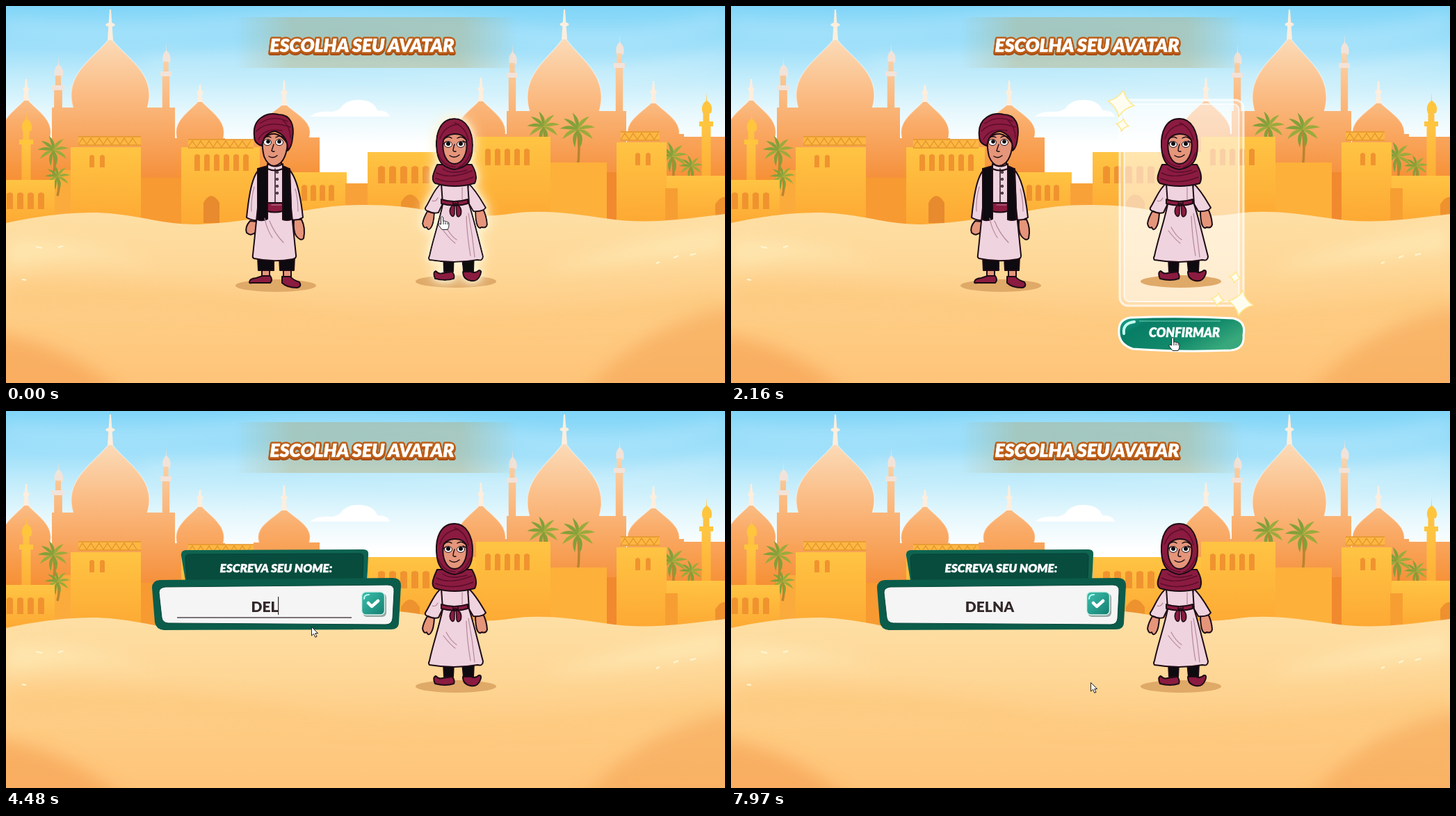
An HTML page for the animation above (8000 ms loop, 1034 px wide and 542 px high).

```html
<!DOCTYPE html>
<html lang="pt">
<head>
<meta charset="utf-8">
<title>Escolha seu avatar</title>
<style>
html, body { margin: 0; width: 100%; height: 100%; overflow: hidden; background: #fed795; }
svg { display: block; width: 100%; height: 100%; }
text { font-family: Lato, "Open Sans", sans-serif; font-weight: 900; text-anchor: middle; }
.label { font-style: italic; fill: #fff; stroke: #fff; stroke-width: .5; }
.ink { stroke: #1d0b14; stroke-width: 2; stroke-linejoin: round; stroke-linecap: round; }
.thin { fill: none; stroke: #1d0b14; stroke-width: 1.4; stroke-linecap: round; }
.fold { fill: none; stroke: #b58799; stroke-width: 1.2; stroke-linecap: round; }
.wine { fill: #8b1b40; }
.shade { fill: none; stroke: #5c0d2b; stroke-width: 1.4; stroke-linecap: round; }
.cloth { fill: #efd3df; }
.skin { fill: #e5957a; }
.black { fill: #0d0a10; }
</style>
</head>
<body>
<svg viewBox="0 0 1034 542" preserveAspectRatio="none">
  <defs>
    <linearGradient id="sky" x2="0" y2="1">
      <stop stop-color="#80d5f8"/><stop offset=".2" stop-color="#a0e0fa"/>
      <stop offset=".33" stop-color="#c2ecfb"/><stop offset=".48" stop-color="#e4f7fd"/>
      <stop offset=".64" stop-color="#fff"/>
    </linearGradient>
    <linearGradient id="far" gradientUnits="userSpaceOnUse" x1="0" x2="0" y1="45" y2="250">
      <stop stop-color="#fbdcba"/><stop offset=".4" stop-color="#fbbc84"/><stop offset="1" stop-color="#f58f3a"/>
    </linearGradient>
    <linearGradient id="near" gradientUnits="userSpaceOnUse" x1="0" x2="0" y1="105" y2="250">
      <stop stop-color="#f9cda0"/><stop offset=".45" stop-color="#faab68"/><stop offset="1" stop-color="#f69035"/>
    </linearGradient>
    <linearGradient id="wall" x2="0" y2="1">
      <stop stop-color="#ffc443"/><stop offset="1" stop-color="#fda934"/>
    </linearGradient>
    <linearGradient id="sand" x2="0" y2="1">
      <stop stop-color="#fee0a6"/><stop offset=".35" stop-color="#fed797"/>
      <stop offset=".7" stop-color="#fecb82"/><stop offset="1" stop-color="#fec479"/>
    </linearGradient>
    <linearGradient id="band">
      <stop stop-color="#b9a35c" stop-opacity="0"/><stop offset=".2" stop-color="#b9a35c" stop-opacity=".36"/>
      <stop offset=".8" stop-color="#b9a35c" stop-opacity=".36"/><stop offset="1" stop-color="#b9a35c" stop-opacity="0"/>
    </linearGradient>
    <linearGradient id="green" x2="1" y2=".5">
      <stop stop-color="#23a78f"/><stop offset=".25" stop-color="#087d66"/>
      <stop offset=".7" stop-color="#128a6a"/><stop offset="1" stop-color="#38a87c"/>
    </linearGradient>
    <linearGradient id="teal" x2="1" y2="1">
      <stop stop-color="#3cc0ae"/><stop offset="1" stop-color="#137e70"/>
    </linearGradient>
    <filter id="soft" x="-50%" y="-100%" width="200%" height="300%"><feGaussianBlur stdDeviation="12"/></filter>
    <filter id="glow" x="-60%" y="-20%" width="220%" height="140%">
      <feDropShadow dx="0" dy="0" stdDeviation="4" flood-color="#fff8e0"/>
      <feDropShadow dx="0" dy="0" stdDeviation="9" flood-color="#fff4cf"/>
    </filter>
  </defs>

  <rect width="1034" height="310" fill="url(#sky)"/>
  <path d="M0 28Q180 42 340 24T700 34T1034 18M200 84Q430 66 620 92T1034 72" fill="none" stroke="#fff" stroke-opacity=".3" stroke-width="12" filter="url(#soft)"/>
  <path d="M437 159q10-9 32-7q7-1 12-5q8-13 28-12q20 1 25 15q15 0 18 9z" fill="#fff"/>
  <g id="city"></g>

  <path d="M0 312C50 301 90 297 130 297C190 299 220 314 275 314C350 311 420 294 470 288C520 284 570 286 610 295C650 303 690 304 730 298C770 292 820 299 860 305C920 315 980 306 1034 299V542H0z" fill="url(#sand)"/>
  <g filter="url(#soft)">
    <path d="M0 335Q110 332 220 375Q120 350 0 378z" fill="#fff0bd" opacity=".55"/>
    <path d="M1034 318Q880 340 770 380Q900 368 1034 352z" fill="#fff0bd" opacity=".55"/>
    <path d="M0 395Q220 388 430 432T1034 405V440Q650 470 430 450T0 440z" fill="#fcbb66" opacity=".25"/>
    <path d="M-20 470Q90 485 170 560H-20z" fill="#f28f3f" opacity=".42"/>
    <path d="M1054 430Q910 455 830 560H1054z" fill="#f39645" opacity=".4"/>
  </g>
  <path d="M43 346l9 2M75 347l7-2M23 393l6 1M960 362l7-3M984 358l8-2M935 370l5-2" stroke="#fff6d2" stroke-width="2"/>

  <rect x="330" y="16" width="405" height="73" fill="url(#band)"/>
  <g class="label" font-size="26.5" paint-order="stroke" stroke-linejoin="round">
    <text x="512" y="67.5" fill="#a94c12" stroke="#a94c12" stroke-width="6">ESCOLHA SEU AVATAR</text>
    <text x="512" y="66" stroke="#bd5f18" stroke-width="5.5">ESCOLHA SEU AVATAR</text>
    <text x="512" y="66">ESCOLHA SEU AVATAR</text>
  </g>

  <g id="card">
    <rect x="559" y="135" width="178" height="296" rx="12" fill="#fff" fill-opacity=".3" stroke="#fff" stroke-opacity=".7" stroke-width="3"/>
    <rect x="565.5" y="141" width="165" height="284" rx="8" fill="#fff" fill-opacity=".38" stroke="#fff" stroke-opacity=".7" stroke-width="2"/>
    <g id="stars" fill="#fffdf0" stroke="#ffe88c" stroke-width="1.5"></g>
    <path id="buttonShadow" d="M576 449Q650 444 725 450Q744 454 740 474Q742 496 722 497Q645 502 578 496Q556 489 558 466Q558 452 576 449z" fill="#8e5b30" opacity=".75"/>
    <path d="M574 448Q650 445 722 449Q741 453 737 473Q739 493 719 495Q645 498 578 493Q556 486 558 465Q558 451 574 448z" fill="url(#green)" stroke="#fff" stroke-width="3"/>
    <path d="M565 471Q563 456 580 454" fill="none" stroke="#c4fff2" stroke-width="4" stroke-linecap="round"/>
    <path d="M587 453H704" stroke="#6fd1b3" stroke-width="2" opacity=".5"/>
    <text class="label" x="652" y="476" font-size="17.9">CONFIRMAR</text>
  </g>

  <g id="boy">
    <ellipse cx="388" cy="402" rx="58" ry="9" fill="#dfa968"/>
    <g class="ink">
      <path class="skin" d="M368 378h11v13h-11zM399 378h11v13h-11z"/>
      <path class="black" d="M362 360h23v20h-22zM393 360h22l-1 20h-20z"/>
      <path class="wine" d="M350 397q0-5 10-6l9-3h11q4 6 0 10h-26q-4 1-4-1zM397 389h12q4 5 13 8q4 7-4 8q-14 0-21-7z"/>
      <path class="skin" d="M351 309q-8 9-5 17q5 4 8 2q6-1 6-7q3-6 1-11zM414 307q-1 17 3 23q7 9 11 4q3-15-3-27z"/>
      <path class="cloth" d="M364 235C352 246 348 285 346 304q8 5 17 4L369 270zM407 235C420 248 425 285 427 304q-8 5-17 3L404 270z"/>
      <path class="cloth" d="M362 234h46L410 290L417 358q1 5-5 6q-28 5-55-1q-3-1-2-5L362 290z"/>
      <path class="skin" d="M378 218h18v13q-9 4-18 0z"/>
      <path class="cloth" d="M376 227q12 7 22 0v7q-11 5-22 0z"/>
      <path class="wine" d="M375 283h23v12q-11 3-23 0z"/>
      <path class="black" d="M362 234L376 230V306q-8 4-14 1zM398 230L407 234q3 40 3 73q-6 2-12 0z"/>
      <path class="skin" d="M369 192q-1 12 2 24q5 13 14 14q17-2 20-32q-17-25-36-6z"/>
      <path class="wine" d="M357 187C354 161 376 152 392 156C410 156 415 172 412 190Q411 203 405 208Q406 186 387 180Q371 182 368 201Q357 198 357 187z"/>
    </g>
    <path class="shade" d="M360 180Q375 163 409 174M365 169Q383 156 405 166M363 192Q371 175 397 179M398 164Q409 174 409 190"/>
    <path class="thin" d="M387 234V282M371 190q5-4 10-1M388 189q6-4 11 0M385 199q-2 6-3 9q2 2 4 1M378 216q6 4 12-1"/>
    <path class="fold" d="M379 309q7 18 20 31M372 305q3 16 11 28M357 260q-5 18-4 35M416 263q4 14 4 32M382 286h14"/>
    <g fill="#fff" stroke="#1d0b14"><ellipse cx="376" cy="196" rx="5.5" ry="4.5"/><ellipse cx="393" cy="196" rx="5.5" ry="4.5"/></g>
    <g class="black"><circle cx="377" cy="195" r="2.8"/><circle cx="393" cy="195" r="2.8"/></g>
    <g class="thin"><circle cx="390" cy="239" r="1.4"/><circle cx="390" cy="249" r="1.4"/><circle cx="390" cy="259" r="1.4"/><circle cx="390" cy="269" r="1.4"/></g>
  </g>

  <g id="girl">
    <ellipse cx="647" cy="396" rx="58" ry="9" fill="#dfa968"/>
    <g id="girlBody">
    <g class="ink">
      <path class="black" d="M629 362h15l-1 20h-13zM656 362h17l-1 20h-14z"/>
      <path class="wine" d="M617 392q-4-9 1-11q5 5 10 3l14-2q4 6 2 10q-12 4-27 0zM657 382h12q6 3 11-2q5-1 2 7q-4 10-14 8q-11-2-11-13z"/>
      <path class="skin" d="M606 295q-6 10-7 18q2 8 6 5q2 6 6 1q4-5 5-21zM675 293q0 17 3 23q3 5 6 2q7 2 8-4q-1-13-6-22z"/>
      <path class="cloth" d="M626 255C615 263 610 280 603 290q-1 4 4 5q8 4 15 2L631 278zM665 255C676 265 684 280 690 290q-4 6-18 5L662 278z"/>
      <path class="cloth" d="M626 255H664L666 285C674 310 682 345 686 360q0 7-8 5Q645 371 609 365q-2-2 0-6C614 335 623 310 628 285z"/>
      <path class="wine" d="M626 278q18 6 38 0v6q-18 6-38 0z"/>
      <path class="wine" d="M620 228C612 245 612 251 617 255Q645 263 674 255C679 246 674 235 670 228z"/>
      <path class="wine" d="M645 162C625 162 618 182 619 202C620 222 626 232 645 235C664 232 671 222 671 200C671 182 663 162 645 162z"/>
      <path class="skin" d="M629 193C633 182 656 180 662 193C665 212 656 227 645 227C634 227 626 212 629 193z"/>
    </g>
    <path class="shade" d="M624 191Q630 172 651 170M665 193Q661 174 645 168M622 213Q629 231 646 231M668 211Q661 229 650 232M619 240Q639 250 670 237M618 248Q643 258 672 246M628 234Q640 243 663 236"/>
    <g fill="#8b1b40" stroke="#1d0b14" stroke-width="1.5"><path d="M645 284q-9 6-6 15q4 7 6 0zM647 284q10 6 7 16q-4 6-6 0zM643 281h7v6h-7z"/></g>
    <path class="thin" d="M630 191q6-5 11-1M649 190q6-4 11 1M645 199q-2 6-2 9q2 2 4 1M638 215q7 5 14-1M629 198l4-3M661 196l-4-2"/>
    <path class="fold" d="M656 261v17M665 298Q671 330 674 361M662 302Q663 330 668 359M629 323q10 13 17 18M633 318q7 13 15 18M613 280q5 2 8-4"/>
    <g fill="#fff" stroke="#1d0b14"><ellipse cx="636" cy="199" rx="5.5" ry="4.3"/><ellipse cx="654" cy="199" rx="5.5" ry="4.3"/></g>
    <g class="black"><circle cx="636" cy="198" r="3"/><circle cx="654" cy="198" r="3"/></g>
    </g>
  </g>

  <g id="panel">
    <path d="M258 200L514 199Q522 199 521 207L519 250H259L252 208Q251 201 258 200z" fill="#0d6450"/>
    <path d="M264 206L509 205Q514 205 514 210L513 241Q512 246 506 246H267Q261 246 260 241L258 212Q258 206 264 206z" fill="#084c3e" stroke="#0a3f35"/>
    <text class="label" x="388.5" y="232" font-size="17.2">ESCREVA SEU NOME:</text>
    <path d="M221 243L556 240Q568 240 568 251L565 304Q565 314 553 314L227 315Q216 314 214 304L210 254Q210 244 221 243z" fill="#0b5c4a"/>
    <path d="M229 253L549 250Q559 250 558 260L556 298Q555 307 546 307L233 305Q225 304 224 297L220 261Q220 254 229 253z" fill="#f6f5f5" stroke="#07473a"/>
    <path id="underline" d="M246 297H497" stroke="#51484a" stroke-width="1.5"/>
    <text id="entry" x="372" y="289" font-size="21"></text>
    <rect id="caret" y="267" width="1.2" height="26" fill="#332829"/>
    <rect id="checkGlow" x="507" y="256" width="42" height="42" rx="9" fill="#f6edbf"/>
    <g id="check">
      <rect x="513" y="262" width="34" height="34" rx="6" fill="#94a6a2"/>
      <rect x="511.5" y="260" width="33" height="33" rx="6" fill="url(#teal)" stroke="#d7f1ea" stroke-width="1.5"/>
      <path d="M515 270q0-6 7-6" fill="none" stroke="#b6fff1" stroke-width="2" stroke-linecap="round"/>
      <path d="M521 276l5 5l9-8" fill="none" stroke="#fff" stroke-width="4.5" stroke-linecap="round" stroke-linejoin="round"/>
    </g>
  </g>

  <g id="cursor" fill="#fff" stroke="#222" stroke-linejoin="round">
    <path id="arrow" d="M.5.5V13L3.6 10.2L5.8 15.3L8 14.3L5.8 9.5H9.6z"/>
    <path id="hand" d="M-1.5 12V2Q0-1 1.7 2V7.5Q4 6 5 8Q7 7 8 9Q10 8.5 10 11Q10.5 16 8 19.5H0L-5 13Q-5.5 9.5-1.5 12zM2 8v4M5 9v3M8 10v2"/>
  </g>
</svg>

<script>
const $ = id => document.getElementById(id);
const rect = (x, y, w, h, fill) => `<rect x="${x}" y="${y}" width="${w}" height="${h}" fill="${fill}"/>`;

function dome(x, spire, top, base, half, fill) {
  const h = base - top;
  return `<path d="M${x - half * .9} ${base}C${x - half * 1.26} ${base - h * .5} ${x - half * .38} ${top + h * .28} ${x} ${top}
    C${x + half * .38} ${top + h * .28} ${x + half * 1.26} ${base - h * .5} ${x + half * .9} ${base}z" fill="${fill}" stroke="#fff" stroke-opacity=".4" stroke-width="1.5"/>
    <path d="M${x - 1} ${spire}h2l3 ${top - spire + 4}h-8z" fill="#fdeedd"/>
    <ellipse cx="${x}" cy="${spire + (top - spire) * .55}" rx="${half / 10 + 1}" ry="3" fill="#fdeedd"/>`;
}

function minaret(x, top, base, w, fill, tip = "#f1e3da") {
  const cap = top + 28;
  return `<path d="M${x} ${top}l1 12q${w} 7 ${w * .6} 18h${-w * 1.2}q${-w * .4}-11 ${w * .6 - 1}-18z" fill="${tip}"/>`
    + rect(x - w * .45, cap, w * .9, base - cap, fill) + rect(x - w, cap + 14, w * 2, 7, tip)
    + rect(x - w * .65, cap + 21, w * 1.3, base - cap - 21, fill);
}

function windows(x, y, count, step, w, h) {
  let d = "";
  for (let i = 0; i < count; i++) d += `M${x + i * step} ${y + h}v${-h + 2}q${w / 2}-4 ${w} 0v${h - 2}z`;
  return `<path d="${d}" fill="#f0932f"/>`;
}

function band(x, y, w) {
  let d = `M${x} ${y}h${w}M${x} ${y + 12}h${w}M${x} ${y + 11}`;
  for (let i = 0; i < w / 6 - 1; i++) d += `l6 ${i % 2 ? 9 : -9}`;
  return rect(x, y, w, 13, "#fdb742") + `<path d="${d}" fill="none" stroke="#e5962d" stroke-width="1.3"/>`;
}

function palm(x, y, r, trunk) {
  let s = `<path d="M${x} ${y}q4 ${trunk / 2} 0 ${trunk}" fill="none" stroke="#b9842f" stroke-width="3.5"/>`;
  for (const a of [-165, -130, -95, -60, -20, 20, 70, 110, 160]) {
    const bend = Math.cos(a * Math.PI / 180) < 0 ? -1 : 1;
    s += `<path transform="translate(${x} ${y}) rotate(${a})" d="M0 0Q${r * .5} ${-r * .3 * bend} ${r} ${r * .2 * bend}Q${r * .5} ${r * .12 * bend} 0 0z" fill="${a % 20 ? "#83a03a" : "#9aab3c"}"/>`;
  }
  return s;
}

const far = "url(#far)", near = "url(#near)", wall = "url(#wall)", gold = "#ffc53d";
$("city").innerHTML = [
  minaret(75, 72, 200, 9, far), minaret(230, 52, 200, 8, far),
  dome(150, 5, 45, 152, 57, far), rect(66, 146, 177, 165, far),
  dome(29, 105, 132, 196, 36, near), rect(0, 190, 100, 120, near),
  dome(279, 113, 134, 196, 35, near), rect(243, 190, 72, 120, near),
  dome(400, 107, 139, 194, 38, near), rect(356, 189, 95, 80, near),
  minaret(728, 54, 200, 8, far), minaret(882, 40, 200, 8, far),
  dome(803, 5, 44, 156, 54, far), rect(720, 151, 172, 130, far),
  dome(683, 103, 133, 196, 36, far), rect(650, 184, 80, 60, far),
  dome(931, 108, 136, 196, 38, near), rect(893, 184, 82, 80, near),
  rect(968, 188, 66, 90, near),
  minaret(29, 150, 265, 10, wall, gold), minaret(1007, 124, 262, 10, wall, gold),
  rect(65, 236, 30, 75, "#fbab3c"), rect(194, 247, 60, 66, "#f79a31"),
  palm(68, 208, 22, 35), palm(74, 246, 18, 27),
  rect(0, 250, 70, 62, wall), windows(1, 268, 4, 15, 9, 24),
  rect(93, 203, 101, 109, wall), band(104, 188, 90), windows(120, 214, 2, 15, 7, 18),
  rect(252, 203, 113, 111, wall), band(262, 192, 94), windows(271, 213, 6, 14, 8, 24),
  `<path d="M284 312v-29q11-20 23 0v29z" fill="#e88a2e"/>`,
  rect(362, 239, 128, 73, wall), windows(425, 257, 4, 13, 8, 23),
  rect(488, 255, 34, 45, "#f9a139"),
  rect(520, 210, 157, 92, wall), windows(535, 230, 5, 16, 10, 25),
  `<path d="M568 300v-18q13-22 27 0v18z" fill="#ed922e"/>`,
  palm(773, 174, 23, 42), palm(822, 178, 25, 54),
  rect(782, 225, 82, 84, "#fdb03a"), rect(676, 188, 107, 120, wall), windows(689, 205, 5, 14, 8, 24),
  rect(864, 239, 18, 70, "#f1892e"),
  palm(958, 217, 22, 45), palm(985, 231, 17, 30),
  rect(878, 196, 72, 114, wall), band(884, 181, 56), windows(905, 211, 2, 15, 7, 18),
  rect(950, 244, 84, 66, wall), rect(948, 262, 18, 48, "#f79e33"),
  `<path d="M1020 308v-23q8-12 14-10v33z" fill="#ee912e"/>`
].join("");

$("stars").innerHTML = [[561, 140, 19], [563, 171, 9], [733, 427, 18], [700, 422, 9], [725, 390, 8]]
  .map(([x, y, r]) => `<path transform="translate(${x} ${y}) rotate(10)" d="M0 ${-r}Q${r * .3} ${-r * .3} ${r} 0Q${r * .3} ${r * .3} 0 ${r}Q${-r * .3} ${r * .3} ${-r} 0Q${-r * .3} ${-r * .3} 0 ${-r}z"/>`).join("");

const LOOP = 8000, NAME = "DELNA";
const keystrokes = [4010, 4190, 4480, 4580, 4780];
// Pointer moves: first step, last step, step count, destination.
const moves = [
  [80, 190, 2, 652, 289], [1080, 1770, 8, 635, 476], [2550, 2930, 5, 435, 296],
  [3400, 3400, 1, 439, 310], [5370, 5370, 1, 478, 265], [5960, 6340, 5, 539, 272],
  [7420, 7970, 7, 517, 390]
];

const within = (t, ...spans) => spans.some(([from, to]) => t >= from && t < to);
const show = (id, on) => $(id).setAttribute("display", on ? "inline" : "none");

function pointer(t) {
  let x = 627, y = 302;
  for (const [start, end, steps, toX, toY] of moves) {
    if (t < start) break;
    const done = t >= end ? 1 : (Math.floor((t - start) / (end - start) * (steps - 1)) + 1) / steps;
    x += (toX - x) * done;
    y += (toY - y) * done;
  }
  return [x, y];
}

function draw(t) {
  show("boy", t < 2270);
  show("card", within(t, [600, 2270]));
  show("buttonShadow", t < 1600);
  show("panel", t >= 2270);
  $("girlBody").setAttribute("filter", t < 600 ? "url(#glow)" : "none");

  const typed = keystrokes.filter(k => t >= k).length;
  const entry = $("entry");
  entry.textContent = typed ? NAME.slice(0, typed) : "DIGITE AQUI...";
  entry.setAttribute("fill", typed ? "#332829" : "#4d4a4a");
  entry.setAttribute("font-style", typed ? "normal" : "italic");
  show("underline", within(t, [3130, 6830]));
  show("caret", within(t, [3130, 3620], [4010, 5300], [5870, 6330]));
  if (t >= 2270) $("caret").setAttribute("x", 371.5 + (typed ? entry.getComputedTextLength() / 2 : 0));

  const [x, y] = pointer(t);
  const hand = t < 2550 || (x >= 511 && y < 294 && t > 5960);
  show("cursor", !within(t, [2930, 3400], [5370, 5960]));
  show("hand", hand);
  show("arrow", !hand);
  $("cursor").setAttribute("transform", `translate(${x} ${y})`);
  show("checkGlow", hand && t > 5960);
  $("check").setAttribute("transform", within(t, [6830, 7140]) ? "translate(0 1)" : "");
}

const start = performance.now();
function frame() {
  draw((performance.now() - start) % LOOP);
  requestAnimationFrame(frame);
}
frame();
</script>
</body>
</html>
```
